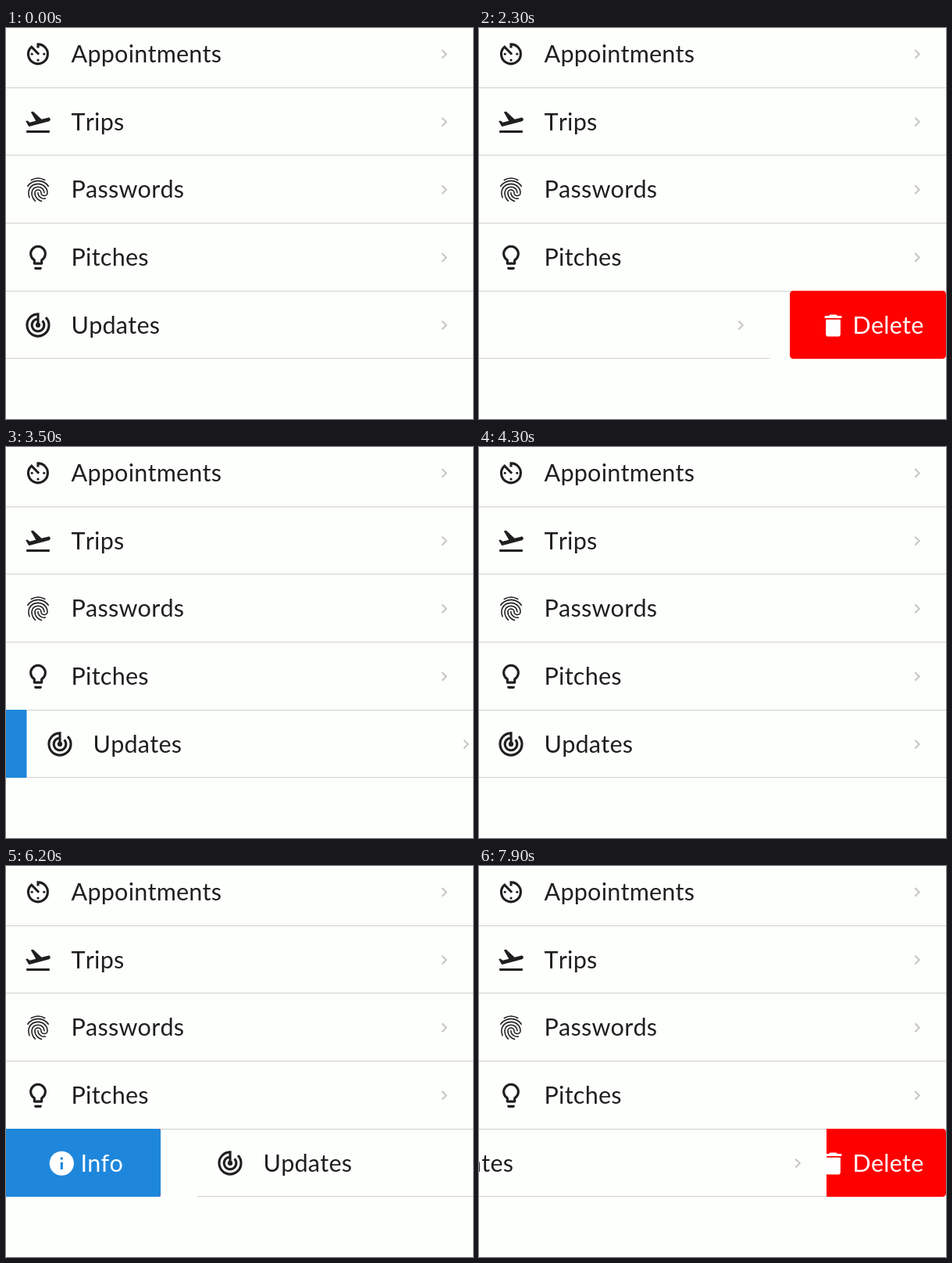
These frames come from a looping animation (598x500 px, 8 s). An HTML page:

```html
<!DOCTYPE html>
<html lang="en">
<head>
<meta charset="utf-8">
<title>Swipe list</title>
<style>
  html, body { margin: 0; width: 100%; height: 100%; overflow: hidden; background: #fdfffc; }
  svg { display: block; width: 598px; height: 500px; }
  text { font: 30.5px Lato, sans-serif; font-kerning: none; letter-spacing: .25px; fill: #1f1f1f; }
  .button text { fill: #fff; }
  .icon { fill: #1f1f1f; }
  .stroke { fill: none; stroke: #1f1f1f; stroke-width: 2; }
  .thin { stroke-width: 1; stroke-linecap: round; }
  .line { fill: #d0d1cf; }
  .chevron { fill: none; stroke: #c6c8c5; stroke-width: 2.1; }
</style>
</head>
<body>
<svg id="stage" viewBox="0 0 598 500"></svg>
<script>
const LOOP = 8000, STEP = 100;
const PITCH = 86.667, FIRST_CENTER = 33.3, ICON_SCALE = 1.56;
const stage = document.getElementById('stage');

// Icons live on a 24 unit grid.
const icons = {
  timer: `<path class="stroke" d="M12 7V4A8 8 0 1 1 5.9 6.8M6 5.5L12.7 12.3"/>
    <g class="icon"><circle cx="12" cy="17" r="1"/><circle cx="17" cy="12" r="1"/><circle cx="7" cy="12" r="1"/></g>`,
  plane: `<path class="icon" d="M2.5 19h19v2h-19zM22.07 9.64c-.21-.8-1.04-1.28-1.84-1.06L14.92 10l-6.9-6.43-1.93.51
    4.14 7.17-4.97 1.33-1.97-1.54-1.45.39 2.59 4.49 1.6-.43 5.31-1.42 4.35-1.16L21 11.49c.81-.23 1.28-1.05 1.07-1.85z"/>`,
  finger: `<path class="stroke thin" d="M6.4 4.2C10 2.1 14 2.1 17.6 4.2
    M3.5 9.2C4.5 7.8 5.8 6.7 7.2 6C10.2 4.5 14 4.5 16.9 6C18.3 6.7 19.5 7.8 20.5 9.2
    M9.75 21.3C8.9 20.4 8.5 20 7.8 18.8C7.2 17.6 6.84 16.2 6.84 14.66C6.84 12 9.15 9.77 12 9.77S17.16 12 17.16 14.66
    M18 19.35C16.5 19.6 15.2 19.3 14.2 18.6C12.75 17.6 11.94 16.2 11.94 14.66"/>
    <path class="stroke thin" d="M14.9 21.5C13.4 21.1 12.4 20.5 11.4 19.5C10.1 18.2 9.4 16.5 9.4 14.66
    C9.4 13.3 10.55 12.2 11.97 12.2S14.55 13.3 14.55 14.66C14.55 16 15.7 17.1 17.13 17.1S19.7 16 19.7 14.66
    C19.7 10.6 16.2 7.33 11.96 7.33C8.9 7.33 6.2 9 4.9 11.7C4.5 12.5 4.25 13.6 4.25 14.66C4.25 15.5 4.3 16.8 5 18.5"/>`,
  bulb: `<path class="icon" d="M9 20h6v1a1 1 0 0 1-1 1h-4a1 1 0 0 1-1-1z"/>
    <path class="stroke" stroke-linejoin="round" d="M9 17V14.22A6 6 0 1 1 15 14.22V17z"/>`,
  radar: `<path class="stroke" d="M18.36 5.64A9 9 0 1 1 12 3V12M15.54 8.46A5 5 0 1 1 11 7.1"/>
    <circle class="icon" cx="12" cy="12" r="2"/>`,
  trash: `<path fill="#fff" d="M6 19a2 2 0 0 0 2 2h8a2 2 0 0 0 2-2V7H6zM18.4 4H15.5l-1-1h-5l-1 1H5.6a.6.6 0 0 0-.6.6V6h14V4.6a.6.6 0 0 0-.6-.6z"/>`,
  info: `<circle cx="12" cy="12" r="10" fill="#fff"/><path fill="#1e87dc" d="M11 7h2v2h-2zM11 11h2v6h-2z"/>`
};

const rows = [
  ['timer', 'Appointments'], ['plane', 'Trips'], ['finger', 'Passwords'],
  ['bulb', 'Pitches'], ['radar', 'Updates']
];

const icon = (name, x, y) =>
  `<g transform="translate(${x} ${y}) scale(${ICON_SCALE}) translate(-12 -12)">${icons[name]}</g>`;
const label = (text, x, y) => `<text x="${x}" y="${y + 10.7}">${text}</text>`;
const line = y => `<rect class="line" x="-1.5" y="${y}" width="599.5" height="1"/>`;
const lineY = i => Math.floor(76 + PITCH * i);

function row([name, text], i) {
  const y = FIRST_CENTER + PITCH * i;
  return icon(name, 41, y) + label(text, 83.5, y) +
    `<path class="chevron" d="M558.3 ${y - 5.3}l5.4 5.4-5.4 5.4"/>` + line(lineY(i));
}

const last = rows.length - 1;
const lastY = FIRST_CENTER + PITCH * last;
const box = 'y="336" height="87"';
const infoBox = `x="-4" ${box} width="202"`;
stage.innerHTML = rows.slice(0, last).map(row).join('') + `
  <g class="button">
    <rect x="398" ${box} width="200" rx="4.5" fill="#fe0000"/>
    ${icon('trash', 453.5, lastY + .5)}${label('Delete', 478.5, lastY)}
  </g>
  <g class="button">
    <rect ${infoBox} rx="2" fill="#fe0000"/>
    <rect ${infoBox} rx="3" fill="#1e87dc"/>
    ${icon('info', 71.3, lastY + .3)}${label('Info', 95.5, lastY)}
    <rect id="flash" ${infoBox} rx="3" fill="#fff"/>
  </g>
  <g id="slider">
    <rect x="-1.5" y="336" width="599.5" height="88" fill="#fdfffc"/>
    ${line(lineY(last - 1))}${row(rows[last], last)}
  </g>`;

const slider = document.getElementById('slider');
const flash = document.getElementById('flash');

// [time, value] pairs, eased in and out between neighbours.
const slide = [
  [0, 0], [1300, 0], [2000, -225], [2200, -225], [2300, -226], [2500, -200], [2600, -200],
  [3500, 28], [4300, 0], [5600, 0], [6200, 246], [6500, 200], [7600, 200], [8000, -214]
];
const glow = [[0, 0], [6800, 0], [7100, .25], [7500, 0], [8000, 0]];

function valueAt(track, time) {
  const i = track.findIndex(([t]) => t > time);
  const [t0, a] = track[i - 1], [t1, b] = track[i];
  const u = (time - t0) / (t1 - t0);
  return a + (b - a) * (1 - Math.cos(Math.PI * u)) / 2;
}

const start = performance.now();
function draw() {
  const elapsed = (performance.now() - start) % LOOP;
  const time = Math.floor(elapsed / STEP) * STEP;
  slider.setAttribute('transform', `translate(${Math.round(valueAt(slide, time))} 0)`);
  flash.setAttribute('opacity', valueAt(glow, time));
  requestAnimationFrame(draw);
}
draw();
</script>
</body>
</html>
```
